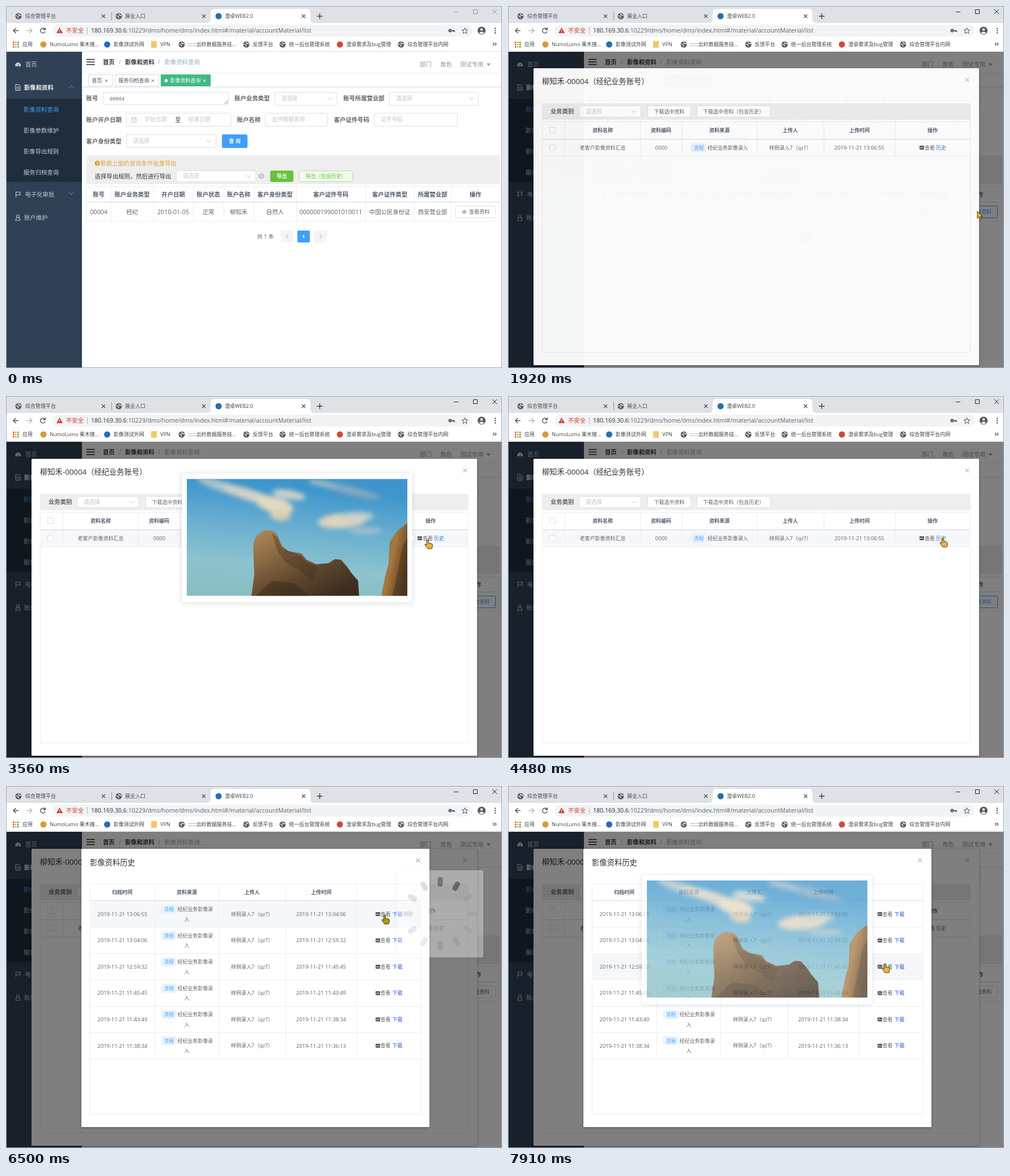
Recreate the animation shown at these times as an HTML page. Size 875x640 px, loop 7990 ms.

```html
<!DOCTYPE html>
<html lang="zh-CN">
<head>
<meta charset="utf-8">
<title>影像资料查询</title>
<style>
html, body { margin: 0; width: 100%; height: 100%; overflow: hidden; background: #fff; }
svg { display: block; width: 875px; height: 640px; font-family: "Open Sans", "Noto Sans CJK SC", "Noto Sans CJK", sans-serif; }
text { white-space: pre; }
.mono { font-family: "Liberation Mono", monospace; }
.pop { filter: drop-shadow(0 1px 5px rgba(0,0,0,.13)); }
.dialog { filter: drop-shadow(0 1px 2px rgba(0,0,0,.3)); }
</style>
</head>
<body>
<script>
const LOOP = 7990;
const INK = '#606266', HINT = '#c0c4cc', BLUE = '#409eff', EDGE = '#dcdfe6', GRID = '#ebeef5';

const add = (p, tag, attrs = {}, str) => {
  const e = document.createElementNS('http://www.w3.org/2000/svg', tag);
  for (const k in attrs) e.setAttribute(k, attrs[k]);
  if (str != null) e.textContent = str;
  p.append(e);
  return e;
};
const group = (p, attrs) => add(p, 'g', attrs);
const rect = (p, x, y, w, h, fill, stroke, rx = 0) => stroke
  ? add(p, 'rect', { x: x + .5, y: y + .5, width: w - 1, height: h - 1, fill, stroke, rx })
  : add(p, 'rect', { x, y, width: w, height: h, fill, rx });
const path = (p, d, stroke, w = 1, fill = 'none') =>
  add(p, 'path', { d, stroke, 'stroke-width': w, fill, 'stroke-linejoin': 'round' });
const dot = (p, cx, cy, r, fill) => add(p, 'circle', { cx, cy, r, fill });
// y is the vertical middle of the glyphs
const text = (p, x, y, str, size = 10.35, fill = INK, anchor = 'start', weight = 400) =>
  add(p, 'text', { x, y: y + size * .36, 'font-size': size, fill, 'text-anchor': anchor, 'font-weight': weight }, str);
const mid = (p, x, y, str, size, fill, weight) => text(p, x, y, str, size, fill, 'middle', weight);
const cross = (p, x, y, r, color, w = 1) =>
  path(p, `M${x - r} ${y - r}l${2 * r} ${2 * r}m0 ${-2 * r}l${-2 * r} ${2 * r}`, color, w);
const chevron = (p, x, y, color = HINT, up = 1) => path(p, `M${x - 4} ${y - 2 * up}l4 ${4 * up} 4 ${-4 * up}`, color);
const field = (p, x, y, w, h, hint, arrow) => {
  rect(p, x, y, w, h, '#fff', EDGE, 2.5);
  if (hint) text(p, x + 12, y + h / 2, hint, 9.7, HINT);
  if (arrow) chevron(p, x + w - 13, y + h / 2);
};
const button = (p, x, y, w, h, label, fill = '#fff', stroke = EDGE, color = INK, weight = 400) => {
  rect(p, x, y, w, h, fill, stroke, 2);
  mid(p, x + w / 2, y + h / 2, label, 9, color, weight);
};
const globe = (p, x, y) => {
  dot(p, x, y, 5.5, '#55595e');
  path(p, `M${x - 4.5} ${y - 1}l4 1.5 0 3M${x - .5} ${y - 4.5}l1 2.5 4 1`, '#fff', 1.3);
};
const columns = (p, xs, y1, y2) => xs.forEach(x => path(p, `M${x + .5} ${y1}V${y2}`, GRID));
const rule = (p, x1, x2, y, color = GRID) => path(p, `M${x1} ${y + .5}H${x2}`, color);
const pictureIcon = (p, x, y) => {
  rect(p, x, y - 3.5, 8, 7, '#555', null, 1);
  path(p, `M${x + 1} ${y + 2}l2 -3 1.5 1.5 1 -1 1.5 2`, '#fff', 1);
};
const flowTag = (p, x, y) => {
  rect(p, x, y - 7.5, 27, 15, '#ecf5ff', '#d9ecff', 2);
  mid(p, x + 13.5, y, '流程', 9, BLUE);
};

const svg = add(document.body, 'svg', { viewBox: '0 0 875 640', width: 875, height: 640 });
const person = '柳知禾', uploader = '样例录入7（qz7）';

// ---- browser window
const win = group(svg);
rect(win, 0, 0, 875, 640, '#fff');
rect(win, 0, 0, 875, 30, '#dee1e6');
path(win, 'M354 30q7 0 7 -7V12q0 -7 7 -7H530q7 0 7 7v11q0 7 7 7z', 'none', 0, '#fff');
globe(win, 22, 18);
text(win, 34, 18, '综合管理平台', 9, '#45494d');
globe(win, 199, 18);
text(win, 210, 18, '展业入口', 9, '#45494d');
dot(win, 375, 18, 5.5, '#2a6cb0');
text(win, 386, 18, '澄卓WEB2.0', 9, '#3c4043');
for (const x of [172, 349, 525]) cross(win, x, 18, 3, '#4a4d51', 1.2);
path(win, 'M186.5 11V25', '#8f949a');
path(win, 'M548.5 18h10m-5 -5v10', '#3c4043', 1.4);
const controls = path(win, 'M790 10.5h8M824.5 6.5h7v7h-7zM858 6l8 8m0 -8l-8 8', '#999');

path(win, 'M22 43.5H13.5m4 -4.5l-4.5 4.5 4.5 4.5', '#4b4f54', 1.4);
path(win, 'M36 43.5H45.5m-4 -4.5l4.5 4.5 -4.5 4.5', '#b5b8bc', 1.4);
path(win, 'M68.5 41a4.3 4.3 0 1 0 .6 4M69.5 38v3.8h-3.8', '#4b4f54', 1.4);
rect(win, 82, 33, 741, 21, '#f1f3f4', null, 10.5);
path(win, 'M94.500 38l5.500 10h-11z', 'none', 0, '#d0392b');
path(win, 'M94.500 41.500v3m0 1v1.300', '#fff', 1.2);
text(win, 106, 43.5, '不安全', 10.35, '#d0392b');
path(win, 'M143.500 37V50', '#b4b8bd');
const url = text(win, 150, 43.5, '', 10.58, '#5f6368');
add(url, 'tspan', { fill: '#2b2e32' }, '180.169.30.6');
add(url, 'tspan', {}, ':10229/dms/home/dms/index.html#/material/accountMaterial/list');
add(win, 'circle', { cx: 783.5, cy: 43.5, r: 2, fill: 'none', stroke: '#4b4f54', 'stroke-width': 2 });
path(win, 'M786 43.5h5v2.500m-2 -2.500v2', '#4b4f54', 1.6);
path(win, 'M809.500 38.500l1.500 3.500 3.800 .3 -2.900 2.500 .9 3.700 -3.300 -2 -3.300 2 .9 -3.700 -2.900 -2.500 3.800 -.3z', '#4b4f54');
dot(win, 839, 43.5, 7, '#55595e');
dot(win, 839, 41.5, 2.2, '#fff');
path(win, 'M834.500 47.500q4.500 -4 9 0q-4.500 4 -9 0z', 'none', 0, '#fff');
for (const dy of [-4, 0, 4]) dot(win, 863, 43.5 + dy, 1.2, '#4b4f54');

const dots = ['#d9453c', '#e0a526', '#3f9b52', '#4a7fd0'];
for (let i = 0; i < 9; i++) rect(win, 12 + i % 3 * 4, 63 + (i / 3 | 0) * 4, 2.5, 2.5, dots[(i + (i / 3 | 0)) % 4]);
text(win, 29, 68, '应用', 9, '#3c4043');
rect(win, 256, 62, 10, 12, '#f3c76a', null, 1);
const marks = [
  [66, 'NumoLumo 果木搜...', '#d59a3a'], [178.5, '影像测试外网', '#2a6cb0'], [261, 'VPN', 'none'],
  [310, '::::::云岭数据服务技...'], [424, '反馈平台'], [488, '统一后台管理系统'],
  [589, '澄卓需求及bug管理', '#cf4a3a'], [697, '综合管理平台内网']
];
for (const [x, label, color] of marks) {
  color ? dot(win, x, 68, 5.5, color) : globe(win, x, 68);
  text(win, x + 11.3, 68, label, 9, '#3c4043');
}
path(win, 'M859 65l2.500 2.500 -2.500 2.500m3.500 -5l2.500 2.500 -2.500 2.500', '#4b4f54', 1.1);
rule(win, 0, 875, 80, '#dfe1e4');

// ---- sidebar
const page = group(svg);
rect(page, 1, 81, 133, 558, '#304156');
rect(page, 1, 164, 133, 147, '#1f2d3d');
const NAV = '#bfcbd9';
path(page, 'M16.500 106.500a5 5 0 1 1 9.500 0z', 'none', 0, '#d5dde6');
path(page, 'M21 106l2 -4M18.500 103h1', '#304156');
text(page, 34, 103, '首页', 10.35, NAV);
path(page, 'M17 139h5.500l2.500 2.500V149H17zM19 143.500h4m-4 2.500h4', '#e8edf2');
text(page, 32, 144, '影像和资料', 10.35, '#f4f4f5', 'start', 600);
chevron(page, 115, 143, '#7c8a9b', -1);
['影像资料查询', '影像参数维护', '影像导出规则', '服务归档查询'].forEach((s, i) =>
  text(page, 31, 183 + 37 * i, s, 10.35, i ? NAV : BLUE));
path(page, 'M17.500 328V338M17.500 329h8l-1.500 2.500 1.500 2.500h-8', NAV, 1.1);
text(page, 33.500, 333, '电子化审批', 10.35, NAV);
chevron(page, 115, 331, '#7c8a9b');
path(page, 'M21 369a2.500 2.500 0 1 1 -.1 0M18.500 374h5l1.500 5h-8z', NAV, 1.1);
text(page, 32, 374, '账户维护', 10.35, NAV);

// ---- page header and tags
path(page, 'M142 94.500h14.500m-14.500 4.500h14.500m-14.500 4.500h14.500', '#222', 1.5);
text(page, 171, 99.500, '首页', 10.35, '#303133', 'start', 600);
text(page, 199, 99.500, '/', 10.35, '#a0a6b0');
text(page, 210, 99.500, '影像和资料', 10.35, '#303133', 'start', 600);
text(page, 268, 99.500, '/', 10.35, '#a0a6b0');
text(page, 279.500, 99.500, '影像资料查询', 10.35, '#97a8be');
for (const [x, s] of [[730, '部门'], [766, '角色'], [801, '测试专用']]) text(page, x, 103, s, 10.35, '#8f949b');
path(page, 'M847.500 101.500h7.500l-3.700 4.500z', 'none', 0, '#9a9fa6');
rule(page, 134, 871, 118, '#eceef1');
rule(page, 134, 875, 143, '#d8dce5');
const tag = (x, w, label, on) => {
  rect(page, x, 121, w, 21, on ? '#42b983' : '#fff', on ? '#42b983' : '#d8dce5');
  if (on) dot(page, x + 9.5, 132, 2.8, '#fff');
  text(page, x + (on ? 16.5 : 6.5), 132, label, 9, on ? '#fff' : '#495060');
  cross(page, x + w - 11, 132, 2.2, on ? '#fff' : '#777');
};
tag(145, 43, '首页');
tag(192, 78, '服务归档查询');
tag(273, 88, '影像资料查询', true);

// ---- search form
const label = (x, y, s) => text(page, x, y, s, 10.4, INK, 'start', 600);
label(141.500, 163, '账号');
field(page, 171, 152, 222, 23);
text(page, 183, 163.500, '00004', 8.8, INK).setAttribute('class', 'mono');
path(page, 'M385.500 173l6 -6m-2.500 6l2.500 -2.500', '#777');
label(403, 163, '账户业务类型');
field(page, 473.500, 152, 111, 24, '请选择', true);
label(595, 163, '账号所属营业部');
field(page, 676, 152, 158, 24, '请选择', true);
label(141.500, 201, '账户开户日期');
field(page, 212, 189, 185, 24);
path(page, 'M221.500 197.500h8v8h-8zM221.500 200h8m-6 -4v2m4 -2v2m-4 4.500h4', HINT);
text(page, 245, 201, '开始日期', 9.7, HINT);
text(page, 298.500, 201, '至', 10, '#303133');
text(page, 322, 201, '结束日期', 9.7, HINT);
label(407.500, 201, '账户名称');
field(page, 457, 189, 111, 24, '支持模糊查询');
label(578.500, 201, '客户证件号码');
field(page, 649, 189, 148, 24, '证件号码');
label(141.500, 239, '客户身份类型');
field(page, 212, 227, 159, 24, '请选择', true);
button(page, 381, 227, 45, 24, '查 询', BLUE, BLUE, '#fff', 600);

rect(page, 142, 264, 729, 51, '#eee');
dot(page, 161, 278, 4.5, '#dd9a35');
mid(page, 161, 278, '?', 7.5, '#fff', 700);
text(page, 166, 278, '根据上面的查询条件批量导出', 10.38, '#e0a03c');
text(page, 156.500, 301, '选择导出规则，然后进行导出', 10.38, '#303133');
field(page, 300, 291, 141, 20, '请选择', true);
path(page, 'M450.500 296.500l4 2v4.500l-4 2 -4 -2v-4.500zM450.500 299.200a1.600 1.600 0 1 1 -.1 0', '#909399');
button(page, 466, 291, 41, 20, '导出', '#67c23a', '#67c23a', '#fff', 600);
button(page, 517, 291, 95, 20, '导出（包含历史）', '#f0f9eb', '#b9dfa4', '#67c23a');

// ---- result table
const cols = [142, 185, 260, 330, 384, 437, 512, 634, 720, 785, 871];
const heads = ['账号', '账户业务类型', '开户日期', '账户状态', '账户名称', '客户身份类型', '客户证件号码', '客户证件类型', '所属营业部', '操作'];
const cells = ['00004', '经纪', '2010-01-05', '正常', person, '自然人', '000000199001010011', '中国公民身份证', '西安营业部'];
columns(page, cols, 319, 381);
rule(page, 142, 871, 319);
rule(page, 142, 871, 346, '#d5d8de');
rule(page, 142, 871, 380);
heads.forEach((s, i) => mid(page, (cols[i] + cols[i + 1]) / 2, 333, s, 10.35, '#515a6e', 600));
cells.forEach((s, i) => mid(page, (cols[i] + cols[i + 1]) / 2, 364, s, /^\d/.test(s) ? 10.75 : 10.35, INK));
const viewButton = color => {
  const g = group(page);
  rect(g, 792, 353, 72, 22, '#fff', color === INK ? EDGE : color, 2);
  path(g, 'M804.500 364q4 -5 8 0q-4 5 -8 0zM808.500 362.900a1.100 1.100 0 1 1 -.1 0', color, .9);
  text(g, 817, 364, '查看资料', 9, color);
  return g;
};
viewButton(INK);
const viewHover = viewButton(BLUE);

text(page, 443, 408, '共 1 条', 9.6, INK);
rect(page, 485, 397, 22, 21, '#f4f4f5', null, 2);
rect(page, 514, 397, 22, 21, BLUE, null, 2);
rect(page, 544, 397, 22, 21, '#f4f4f5', null, 2);
path(page, 'M497.500 404l-3.500 3.500 3.500 3.500M553.500 404l3.500 3.500 -3.500 3.500', HINT, 1.1);
mid(page, 525, 407.500, '1', 9.6, '#fff', 700);

const veil = rect(svg, 1, 81, 874, 558, '#000');

// ---- account dialog
const dialog = group(svg);
rect(dialog, 45, 111, 786, 525, '#fff', null, 1.5).setAttribute('class', 'dialog');
text(dialog, 60, 134.500, person + '-00004（经纪业务账号）', 13.3, '#303133');
cross(dialog, 810, 131.500, 3.500, '#909399');
rect(dialog, 60, 173, 756, 29, '#eee');
text(dialog, 75, 187, '业务类别', 10.35, INK, 'start', 600);
field(dialog, 125, 177, 110, 21, '请选择', true);
button(dialog, 246, 177, 77, 21, '下载选中资料');
button(dialog, 333, 177, 130, 21, '下载选中资料（包含历史）');
rect(dialog, 60, 205, 756, 409, '#fff', GRID);
const rowHover = rect(dialog, 60, 237, 756, 30, '#f5f7fa');
columns(dialog, [100, 233, 307, 439, 557, 683], 205, 267);
rule(dialog, 60, 816, 236, '#d3d6dc');
rule(dialog, 60, 816, 266);
for (const y of [215, 246]) rect(dialog, 73, y, 11, 11, '#fff', EDGE, 1.5);
['资料名称', '资料编码', '资料来源', '上传人', '上传时间', '操作'].forEach((s, i) =>
  mid(dialog, [167, 270, 373, 498, 620, 749][i], 220.500, s, 9, '#515a6e', 600));
mid(dialog, 167, 251.500, '老客户影像资料汇总', 9, INK);
mid(dialog, 270.500, 251.500, '0000', 9.3, INK);
flowTag(dialog, 323, 251.500);
text(dialog, 352, 251.500, '经纪业务影像录入', 8.95, INK);
mid(dialog, 498, 251.500, uploader, 9, INK);
mid(dialog, 620, 251.500, '2019-11-21 13:06:55', 9.3, INK);
pictureIcon(dialog, 726, 251.500);
text(dialog, 735, 251.500, '查看', 9, INK);
text(dialog, 755, 251.500, '历史', 9, '#2f78d2');
const shade = rect(svg, 45, 111, 786, 525, '#000');

// ---- history dialog
const history2 = group(svg);
rect(history2, 133, 111, 614, 492, '#fff', null, 1.5).setAttribute('class', 'dialog');
text(history2, 148, 135, '影像资料历史', 13.3, '#303133');
cross(history2, 727, 131.500, 3.500, '#6f8f8f');
rect(history2, 148, 173, 585, 408, '#fff', GRID);
const ROW = 46.55;
const lineHover = rect(history2, 148, 203.500, 585, ROW, '#f5f7fa');
columns(history2, [262, 375, 493, 618], 173, 483);
['归档时间', '资料来源', '上传人', '上传时间'].forEach((s, i) =>
  mid(history2, [205, 319, 434, 556][i], 188, s, 9, '#515a6e', 600));
rule(history2, 148, 732, 202, '#d3d6dc');
const times = ['13:06:55', '13:04:06', '12:59:32', '11:45:45', '11:43:49', '11:38:34', '11:36:13'];
times.slice(0, 6).forEach((s, i) => {
  const y = 226.500 + ROW * i;
  mid(history2, 205.500, y, '2019-11-21 ' + s, 9.3, INK);
  flowTag(history2, 274, y - 8.500);
  text(history2, 302.500, y - 8.500, '经纪业务影像录', 8.95, INK);
  mid(history2, 319, y + 9, '入', 9, INK);
  mid(history2, 434, y, uploader, 9, INK);
  mid(history2, 556, y, '2019-11-21 ' + times[i + 1], 9.3, INK);
  pictureIcon(history2, 652, y);
  text(history2, 660.500, y, '查看', 9, INK);
  text(history2, 681.500, y, '下载', 9, '#2a55e6');
  rule(history2, 148, 732, Math.round(y + 22.500));
});

// ---- picture popover
const defs = add(svg, 'defs');
const gradient = (id, x2, y2, ...stops) => {
  const g = add(defs, 'linearGradient', { id, x1: 0, y1: 0, x2, y2 });
  stops.forEach((c, i) => add(g, 'stop', { offset: i / (stops.length - 1), 'stop-color': c }));
};
gradient('sky', -.15, 1, '#3e95cb', '#68aed0', '#8cc3cd', '#86bcbf');
gradient('rock', .8, 1, '#b08a58', '#8a6a43', '#5d452d', '#3a2c20');
gradient('cliff', 1, .6, '#7a5a35', '#a9783f', '#5a3f26');
add(add(defs, 'clipPath', { id: 'frame' }), 'rect', { width: 389, height: 207 });
add(add(defs, 'filter', { id: 'soft', x: '-20%', y: '-20%', width: '140%', height: '140%' }), 'feGaussianBlur', { stdDeviation: 4 });

const photo = group(svg);
const card = path(photo, 'M312 137H714.500q2 0 2 2V246l4 5 -4 5V363q0 2 -2 2H312q-2 0 -2 -2V139q0 -2 2 -2z', GRID, .6, '#fff');
card.setAttribute('class', 'pop');
const view = group(photo, { transform: 'translate(319 146.500)', 'clip-path': 'url(#frame)' });
rect(view, 0, 0, 389, 207, 'url(#sky)');
const clouds = group(view, { filter: 'url(#soft)' });
[[70, 16, 55, 9, 18, '#a9c4cc'], [115, 30, 55, 10, 18, '#d0d2c6'], [155, 46, 34, 14, 15, '#e2d8c0'],
 [165, 65, 18, 9, 5, '#d9cdb4'], [180, 28, 30, 8, 10, '#c9d0cb'], [285, 20, 60, 7, 14, '#86a9bd'],
 [238, 8, 25, 5, 10, '#9dbccb'], [275, 74, 44, 13, -5, '#ddd3bc'], [300, 66, 30, 7, 0, '#c9cfc8'], [315, 92, 30, 5, 0, '#a8c3c6']
].forEach(([x, y, rx, ry, a, fill]) =>
  add(clouds, 'ellipse', { rx, ry, fill, transform: `translate(${x} ${y}) rotate(${a})` }));
path(view, 'M114 207L119 170 117 118Q120 98 130 96 136 89 146 91 156 92 160 100L168 119 180 128 202 132 211 143 228 151 250 149 261 142 272 143 284 157 290 166 302 180 304 207z', 'none', 0, 'url(#rock)');
path(view, 'M150 96L160 104 168 122 200 136 212 148 232 156 222 180 196 160 176 150 160 128z', 'none', 0, 'rgba(62,45,30,.35)');
path(view, 'M122 207L150 180 190 185 215 207z', 'none', 0, 'rgba(45,33,22,.4)');
path(view, 'M343 207L350 172 356 150 358 112 370 93 389 78V207z', 'none', 0, 'url(#cliff)');
path(view, 'M362 207L372 165 380 120 389 105V207z', 'none', 0, 'rgba(50,34,20,.35)');

const spinner = group(svg);
rect(spinner, -76, -77, 152, 154, '#fff', null, 2.500).setAttribute('class', 'pop');
const wheel = group(spinner);
for (let i = 0; i < 12; i++) add(wheel, 'rect', {
  x: -4.5, y: -65, width: 9, height: 17, rx: 4, fill: '#333',
  opacity: i < 2 ? .9 - .15 * (1 - i) : .12 + .045 * Math.max(0, i - 4), transform: `rotate(${i * 30})`
});

// ---- pointer
const arrow = path(svg, 'M0 0V12.500L3 9.800 5.200 14.500 7.400 13.500 5.300 9H9.200Z', '#3a2a10', 1, '#f5b800');
const hand = path(svg, 'M-1.500 1a1.600 1.600 0 0 1 3 0V6l5 1q2 .5 2 2.500l-.6 4 -1 2.500H0L-3.500 11.500l-1.500 -3q1 -1.500 3.500 .5z', '#4a3810', 1, '#e8b53a');

rect(svg, 0, 0, 875, 640, 'none', '#a4a8ae');

// ---- timing tables: [ms, value, ...]
const POINTER = [[290, 18, 612], [420, 150, 614], [640, 340, 490], [780, 493, 447], [930, 650, 403], [1070, 828, 363],
  [2170, 828, 363], [2500, 800, 320], [2925, 744, 254], [4090, 744, 254], [4170, 767, 251],
  [5870, 767, 251], [6100, 774, 342], [6420, 668, 228], [6970, 668, 228], [7095, 666, 270], [7740, 666, 270], [7800, 665, 314]];
const VEIL = [[1695, 0], [1770, .6], [1845, .95], [1920, 1]];
const DIALOG = [[1695, 0], [1770, .35], [1845, .75], [1920, .96], [1995, 1]];
const HISTORY = [[5145, 0], [5220, .4], [5295, .8], [5370, .96], [5445, 1]];
const PHOTO = [[3270, 0], [3345, .6], [3420, 1], [4170, 1], [4245, .75], [4470, 0],
  [6495, 0], [6570, .65], [6645, 1], [7020, 1], [7095, .7], [7245, 0], [7395, 0], [7470, .65], [7545, 1], [7770, 1], [7845, .75], [7920, .4]];
const SPINNER = [[2970, 0], [3045, .35], [3195, 1], [3270, 1], [3340, 0],
  [6420, 0], [6495, .35], [6565, 0], [7245, 0], [7320, .35], [7390, 0]];

const at = (table, t) => {
  const i = table.findIndex(k => k[0] > t);
  if (i < 0) return table[table.length - 1].slice(1);
  if (!i) return table[0].slice(1);
  const a = table[i - 1], b = table[i], f = (t - a[0]) / (b[0] - a[0]);
  return a.slice(1).map((v, j) => v + (b[j + 1] - v) * f);
};
const fade = (e, o) => { e.setAttribute('opacity', o); e.style.display = o > 0 ? '' : 'none'; };
const show = (e, on) => fade(e, on ? 1 : 0);
const move = (e, x, y) => e.setAttribute('transform', `translate(${x} ${y})`);

function draw(time) {
  const t = Math.floor((time - 45) / 75) * 75 + 45;
  controls.setAttribute('stroke', t < 1620 ? '#999' : '#222');
  show(viewHover, t >= 1020 && t < 5145);
  fade(veil, .5 * at(VEIL, t)[0]);

  const [open] = at(DIALOG, t);
  fade(dialog, open);
  move(dialog, 0, Math.round(-20 * (1 - open)));
  show(rowHover, t >= 2850 && t < 5145);
  fade(shade, t >= 5145 ? .5 : 0);
  fade(history2, at(HISTORY, t)[0]);
  show(lineHover, t >= 6345);
  move(lineHover, 0, ROW * (t < 7020 ? 0 : t < 7770 ? 1 : 2));

  fade(photo, at(PHOTO, t)[0]);
  move(photo, t < 5000 ? 0 : -74, t < 5000 ? 0 : t < 7300 ? -26 : 20.5);
  fade(spinner, at(SPINNER, t)[0]);
  move(spinner, t < 5000 ? 640 : 766, t < 5000 ? 251 : t < 7100 ? 226 : 272.5);
  wheel.setAttribute('transform', `rotate(${(t - 6495) / 75 * 30})`);

  const [x, y] = at(POINTER, t);
  const onLink = t >= 2900 && t < 5900 || t >= 6390;
  show(arrow, time >= 290 && !onLink);
  show(hand, onLink);
  move(arrow, x, y);
  move(hand, x, y);
  hand.setAttribute('fill', t >= 6390 && t < 7020 ? '#aa9a14' : '#e8b53a');
}

const start = performance.now();
const tick = () => {
  draw((performance.now() - start) % LOOP);
  requestAnimationFrame(tick);
};
tick();
</script>
</body>
</html>
```
